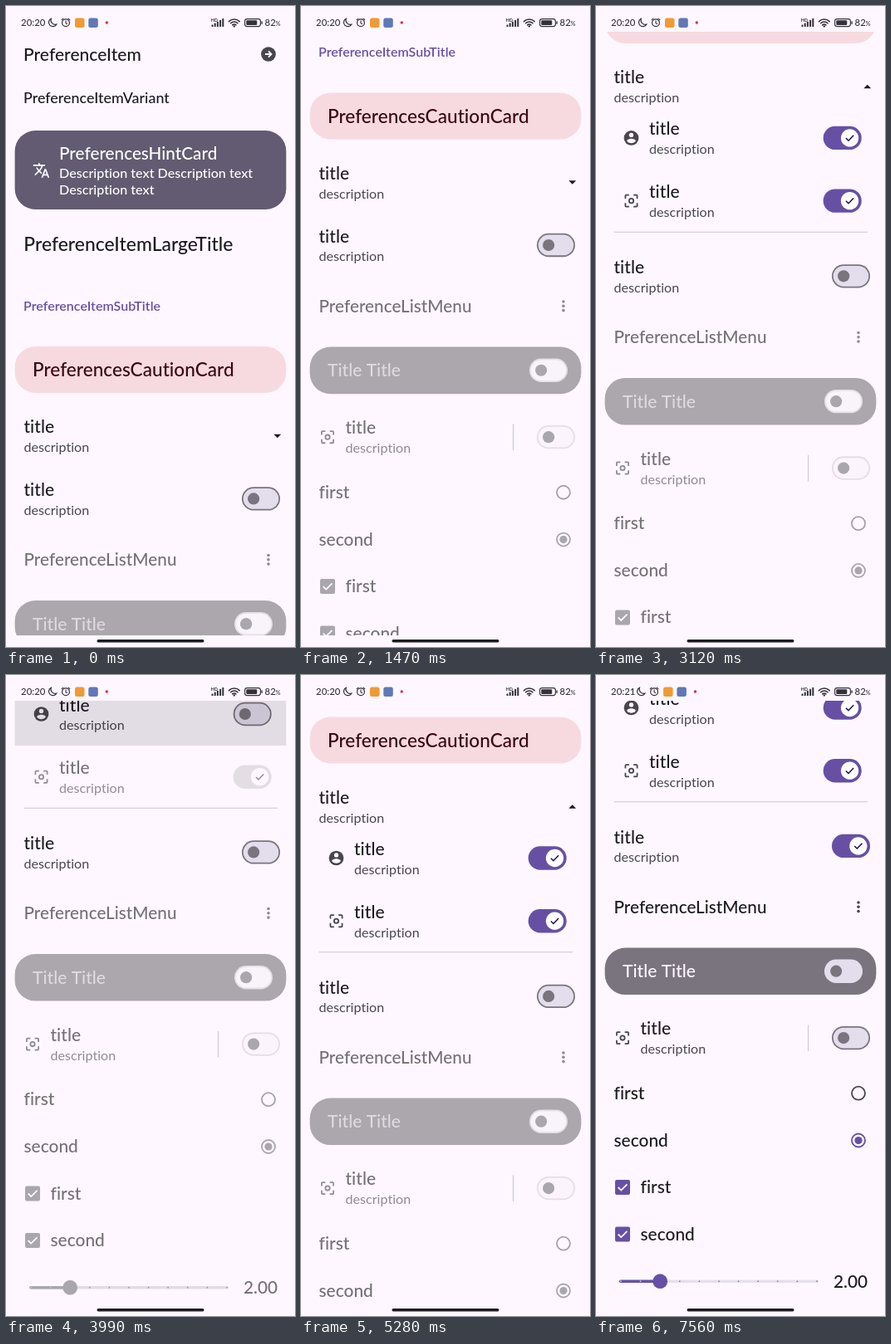
Recreate the animation shown at these times as an HTML page with a canvas. Size 348 px wide and 772 px high, loop 8 s.

```html
<!DOCTYPE html>
<html lang="en">
<head>
<meta charset="utf-8">
<title>Preference list</title>
<style>
html, body { margin: 0; width: 100%; height: 100%; overflow: hidden; background: #fef7ff; }
canvas { display: block; width: 348px; height: 772px; }
</style>
</head>
<body>
<canvas id="stage"></canvas>
<script>
const W = 348, H = 772, LOOP = 8000, DP = 0.886;
const TOP = 31, BOTTOM = 758, OPEN = 153;
const CARD_X = 12 * DP, CARD_W = W - 24 * DP, CARD_R = 28 * DP;
const BG = '#fef7ff', INK = '#1d1b20', SOFT = '#49454f', GREY = '#79747e';
const PURPLE = '#6750a4', LINE = '#cac4d0';

const canvas = document.getElementById('stage');
const ctx = canvas.getContext('2d');
const dpr = window.devicePixelRatio || 1;
canvas.width = W * dpr;
canvas.height = H * dpr;

// Timing helpers
const clamp = v => Math.max(0, Math.min(1, v));
const lerp = (a, b, p) => a + (b - a) * p;
const ramp = (t, start, length) => clamp((t - start) / length);
const easeIn = u => u * u;
const linear = u => u;
const easeOut = u => 1 - (1 - u) ** 3;
const smooth = u => u * u * (3 - 2 * u);

function mix(a, b, p) {
  const part = (c, i) => parseInt(c.slice(i, i + 2), 16);
  return 'rgb(' + [1, 3, 5].map(i => Math.round(lerp(part(a, i), part(b, i), p))).join(',') + ')';
}

// Scroll: start, end, target offset, easing
const scrolls = [
  [890, 1110, 71.6, easeIn],
  [1110, 1470, 304.8, linear],
  [1470, 1860, 387.8, easeOut],
  [3000, 3390, 533, smooth],
  [4890, 5280, 359.5, smooth],
  [5680, 5940, 540.5, smooth]
];

function scrollAt(t) {
  let pos = 0;
  for (const [start, end, to, ease] of scrolls) {
    if (t < start) break;
    pos = lerp(pos, to, ease(ramp(t, start, end - start)));
  }
  return pos;
}

const EXPAND = 2319, CHILD_OFF = 3860, CHILD_ON = 4320, UNLOCK = 7280;

// Critically damped spring
function expandAt(t) {
  const s = Math.max(0, t - EXPAND) / 50;
  const p = 1 - (1 + s) * Math.exp(-s);
  return p > 0.998 ? 1 : p;
}

// Drawing helpers
function text(str, x, y, size, color, weight = 500) {
  ctx.font = `${weight} ${size}px Lato, "Open Sans", sans-serif`;
  ctx.letterSpacing = '0.02px'; // any spacing turns ligatures off
  ctx.fillStyle = color;
  ctx.fillText(str, x, y);
}

function box(x, y, w, h, r, color) {
  ctx.fillStyle = color;
  ctx.beginPath();
  ctx.roundRect(x, y, w, h, r);
  ctx.fill();
}

function dot(x, y, r, color) {
  ctx.fillStyle = color;
  ctx.beginPath();
  ctx.arc(x, y, r, 0, 7);
  ctx.fill();
}

function ring(x, y, r, width, color) {
  ctx.strokeStyle = color;
  ctx.lineWidth = width;
  ctx.beginPath();
  ctx.arc(x, y, r, 0, 7);
  ctx.stroke();
}

function stroke(path, width, color) {
  ctx.strokeStyle = color;
  ctx.lineWidth = width;
  ctx.stroke(new Path2D(path));
}

function icon(x, y, draw) {
  ctx.save();
  ctx.translate(x, y);
  ctx.scale(DP, DP);
  draw();
  ctx.restore();
}

function clipped(x, y, w, h, draw) {
  ctx.save();
  ctx.beginPath();
  ctx.rect(x, y, w, h);
  ctx.clip();
  draw();
  ctx.restore();
}

// Icons
const TRANSLATE = 'M12.87 15.07l-2.54-2.51.03-.03c1.74-1.94 2.98-4.17 3.71-6.53H17V4h-7V2H8v2H1v1.99h11.17' +
  'C11.5 7.92 10.44 9.75 9 11.35 8.07 10.32 7.3 9.19 6.69 8h-2c.73 1.63 1.73 3.17 2.98 4.56l-5.09 5.02L4 19l5-5 ' +
  '3.11 3.11.76-2.04zM18.5 10h-2L12 22h2l1.12-3h4.75L21 22h2l-4.5-12zm-2.62 7l1.62-4.33L19.12 17h-3.24z';

function translateIcon(x, y) {
  icon(x, y, () => {
    ctx.translate(-12, -12);
    ctx.fillStyle = '#ffffff';
    ctx.fill(new Path2D(TRANSLATE));
  });
}

function focusIcon(x, y, color) {
  icon(x, y, () => {
    ring(0, 0, 3, 2, color);
    for (let i = 0; i < 4; i++) {
      stroke('M-8 -3V-7Q-8 -8 -7 -8H-3', 2, color);
      ctx.rotate(Math.PI / 2);
    }
  });
}

function accountIcon(x, y) {
  icon(x, y, () => {
    dot(0, 0, 10, SOFT);
    dot(0, -4, 3, BG);
    ctx.fill(new Path2D('M-6 3.9C-5.9 1.9 -2 .8 0 .8S5.9 1.9 6 3.9A7.2 7.2 0 0 1 -6 3.9Z'));
  });
}

function arrowIcon(x, y) {
  icon(x, y, () => {
    dot(0, 0, 10, SOFT);
    stroke('M-4.5 0H3M0 -4L4 0L0 4', 2, BG);
  });
}

function caret(x, y, up) {
  icon(x, y, () => {
    ctx.fillStyle = INK;
    ctx.fill(new Path2D(up ? 'M-5 2.5L0 -2.5L5 2.5Z' : 'M-5 -2.5L0 2.5L5 -2.5Z'));
  });
}

// Controls
const SWITCH = { off: '#e3ddec', edge: GREY, knob: GREY, on: PURPLE, knobOn: '#ffffff', tick: '#21005d' };
const SWITCH_DIM = { off: '#fbf4fc', edge: '#e4dee6', knob: '#aaa6ad', on: '#e3dde4', knobOn: BG, tick: '#8f8b92' };
const SWITCH_CARD = { ...SWITCH, edge: SWITCH.off };
const SWITCH_CARD_DIM = { ...SWITCH_DIM, off: '#f9f3fa' };

function toggle(x, y, on, look) {
  const w = 52 * DP, h = 32 * DP, b = 2 * DP;
  box(x - w / 2, y - h / 2, w, h, h / 2, mix(look.edge, look.on, on));
  box(x - w / 2 + b, y - h / 2 + b, w - 2 * b, h - 2 * b, h / 2 - b, mix(look.off, look.on, on));
  const kx = x + lerp(-10, 10, on) * DP;
  dot(kx, y, lerp(8, 12, on) * DP, mix(look.knob, look.knobOn, on));
  if (on > 0.5) icon(kx, y, () => stroke('M-5.2 .2L-1.8 3.6L5.2 -3.6', 1.6, look.tick));
}

function radio(y, picked, color) {
  ring(316, y, 8, 1.8, color);
  if (picked) dot(316, y, 4.6, color);
}

function checkbox(y, color) {
  box(23, y - 9, 18, 18, 2, color);
  icon(32, y, () => stroke('M-6 0L-2 4L6.2 -4.2', 2, BG));
}

function slider(y, color, rail, mark) {
  const x0 = 30, step = 23.6;
  box(28, y - 1.8, 240, 3.6, 1.8, rail);
  box(28, y - 1.8, 50, 3.6, 1.8, color);
  for (let i = 0; i <= 10; i++) dot(x0 + step * i, y, 0.9, i < 2 ? LINE : mark);
  dot(x0 + step * 2, y, 8.9, color);
}

function pair(x, y, main, sub) {
  text('title', x, y, 21, main);
  text('description', x, y + 22.8, 16.1, sub, 400);
}

// Bounded ripple, grows from the touch point toward the row centre
function ripple(t, start, exit, length, touch, x, y, w, h, baseH) {
  if (t < start || t > exit + length) return;
  const p = smooth(ramp(t, start, 225));
  const r = lerp(w * 0.3, Math.hypot(w / 2, baseH / 2) + 10 * DP, p);
  const alpha = 0.12 * ramp(t, start, 75) * (1 - ramp(t, exit, length));
  clipped(x, y, w, h, () => dot(lerp(touch, x + w / 2, p), y + h / 2, r, `rgba(29,27,32,${alpha})`));
}

function children(t, open) {
  const live = t < CHILD_OFF || t >= CHILD_ON;
  const on = 1 - ramp(t, CHILD_OFF, 100) + ramp(t, CHILD_ON, 100);
  const height = OPEN * open;
  clipped(0, 543, W, height, () => {
    ctx.translate(0, height - OPEN);
    accountIcon(42.5, 580);
    pair(64, 576.5, INK, SOFT);
    toggle(296.7, 580, on, SWITCH);
    ripple(t, 3795, 4105, 150, 200, CARD_X, 543, CARD_W, 75, 75);
    ripple(t, 4250, 4480, 100, 200, CARD_X, 543, CARD_W, 75, 75);

    const dim = c => live ? c : mix(c, BG, 0.4);
    focusIcon(42.5, 655.7, dim(SOFT));
    pair(64, 652.3, dim(INK), dim(SOFT));
    toggle(296.7, 655.7, 1, live ? SWITCH : SWITCH_DIM);
    box(21.5, 692.8, 305.5, 1, 0, LINE);
    if (open < 1) {
      ctx.globalAlpha = 1 - open;
      box(0, 543, W, OPEN, 0, BG);
    }
  });
}

function lowerItems(t) {
  const live = t >= UNLOCK;
  const dim = c => live ? c : mix(c, BG, 0.39);
  const ink = dim(INK), soft = dim(SOFT);
  const accent = live ? PURPLE : '#aaa6ad';

  pair(21.5, 590, INK, SOFT);
  toggle(307, 593.4, ramp(t, UNLOCK, 100), SWITCH);
  ripple(t, 7215, 7440, 110, 280, 0, 556, W, 75, 75);

  text('PreferenceListMenu', 21.5, 674, 20.7, ink);
  for (let i = -1; i <= 1; i++) dot(316, 666.8 + i * 5.3, 1.8, soft);

  box(CARD_X, 716, CARD_W, 56.6, CARD_R, live ? GREY : '#aba7ac');
  text('Title Title', 32, 751.6, 21, live ? BG : '#dfdae1');
  toggle(298, 744.2, 0, live ? SWITCH_CARD : SWITCH_CARD_DIM);

  focusIcon(32, 824.6, soft);
  pair(53.5, 820.8, ink, soft);
  box(255, 809, 1, 31.5, 0, LINE);
  toggle(307, 824.6, 0, live ? SWITCH : SWITCH_DIM);

  text('first', 21.5, 898.3, 21, ink);
  radio(891.2, false, live ? SOFT : '#a6a2a9');
  text('second', 21.5, 955, 20.9, ink);
  radio(948, true, accent);

  checkbox(1004.5, accent);
  text('first', 53.5, 1011.5, 21, ink);
  checkbox(1061, accent);
  text('second', 53.5, 1068, 20.9, ink);

  slider(1117.7, accent, live ? '#e6e0ec' : '#e2dde4', live ? '#8b7fb0' : '#99959c');
  text('2.00', 286, 1125, 20.8, ink);
}

function list(t) {
  const open = expandAt(t);
  text('PreferenceItem', 21, 66, 21, INK);
  arrowIcon(316, 58);
  text('PreferenceItemVariant', 21, 116.5, 17.9, INK);

  box(CARD_X, 150, CARD_W, 95, CARD_R, '#625b71');
  translateIcon(42.5, 198);
  text('PreferencesHintCard', 64, 184.5, 20.7, '#ffffff');
  text('Description text Description text', 64, 207, 16.1, '#ffffff');
  text('Description text', 64, 227, 16.1, '#ffffff');

  text('PreferenceItemLargeTitle', 21.3, 295.4, 22.9, INK);
  text('PreferenceItemSubTitle', 21, 366.5, 16, PURPLE, 600);

  box(CARD_X, 410, CARD_W, 56, CARD_R, '#f7dadf');
  text('PreferencesCautionCard', 32, 446.4, 22.6, '#3a0713');

  pair(21.5, 514.3, INK, SOFT);
  caret(326.8, 518, t >= EXPAND);
  children(t, open);
  ripple(t, 2220, 2450, 220, 100, 0, 481, W, 74.5 + OPEN * open, 75);

  ctx.translate(0, OPEN * open);
  lowerItems(t);
}

function statusBar(t) {
  const later = t >= 6120;
  const c = '#34313a';
  text(later ? '20:21' : '20:20', 18, 24.2, 11.4, c);
  ctx.save();
  ctx.translate(later ? -1.9 : 0, 0);
  stroke('M54.3 15.2A5 5 0 1 0 60.8 22.2A5.4 5.4 0 0 1 54.3 15.2Z', 1.2, c);
  ring(72, 20.3, 4.4, 1.2, c);
  stroke('M72 17.6V20.6L74 21.8M66.8 17L69.4 14.9M77.2 17L74.6 14.9', 1.1, c);
  box(83, 14.5, 11.5, 11.5, 2.5, '#f09a35');
  box(99.3, 14.5, 11.5, 11.5, 2.5, '#6078b8');
  dot(121.3, 20, 1.7, '#dd2a50');
  ctx.restore();

  text('HD', 246.5, 18.6, 5.5, c, 700);
  for (let i = 0; i < 5; i++) {
    const h = 2.5 + i * 1.9;
    box(247.5 + i * 3.2, 25 - h, 2, h, 0.6, c);
  }
  ctx.lineCap = 'round';
  for (let i = 1; i < 4; i++) {
    ctx.strokeStyle = c;
    ctx.lineWidth = 1.5;
    ctx.beginPath();
    ctx.arc(274.8, 25, i * 3, -Math.PI * 0.75, -Math.PI * 0.25);
    ctx.stroke();
  }
  ctx.lineCap = 'butt';
  dot(274.8, 24.4, 1.2, c);
  ctx.beginPath();
  ctx.roundRect(287.6, 15.6, 18.8, 9, 2.6);
  ctx.strokeStyle = c;
  ctx.lineWidth = 1.1;
  ctx.stroke();
  box(289.3, 17.3, 13, 5.6, 1.2, c);
  box(307.4, 18.2, 1.4, 3.8, 0.7, c);
  text('82', 311.5, 24.2, 11.4, c);
  text('%', 324.6, 24.2, 7.6, c);
}

function render(t) {
  ctx.setTransform(dpr, 0, 0, dpr, 0, 0);
  box(0, 0, W, H, 0, BG);
  clipped(0, TOP, W, BOTTOM - TOP, () => {
    ctx.translate(0, -scrollAt(t));
    list(t);
  });
  statusBar(t);
  box(109.5, 763, 129, 3.4, 1.7, INK);
}

const began = performance.now();
function tick() {
  render((performance.now() - began) % LOOP);
  requestAnimationFrame(tick);
}
tick();
</script>
</body>
</html>
```
